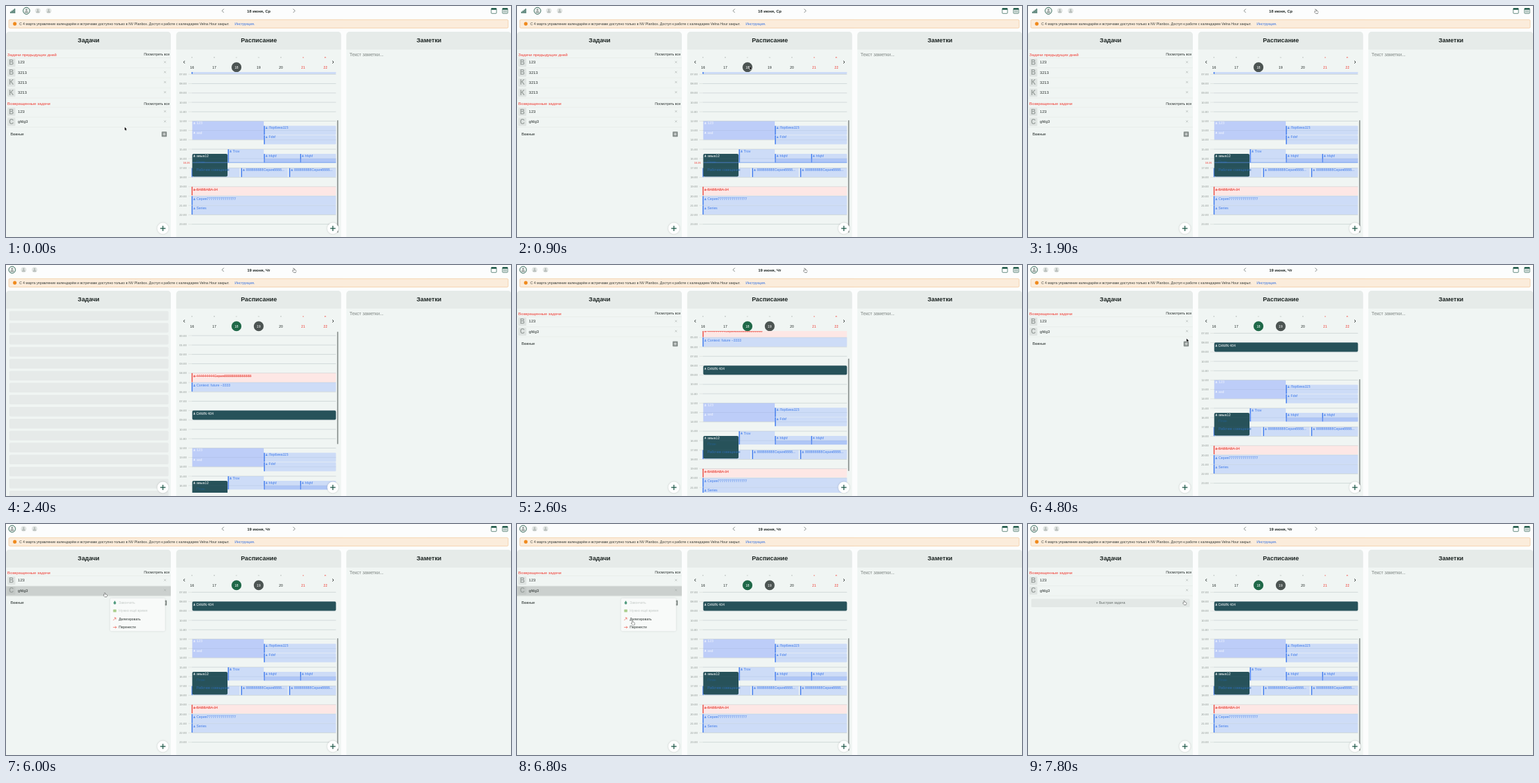
An HTML page with a canvas for the animation above (8 s loop, 766 px wide and 350 px high).

```html
<!DOCTYPE html>
<html lang="ru">
<head>
<meta charset="utf-8">
<title>Планировщик</title>
<style>
html, body { margin: 0; width: 100%; height: 100%; overflow: hidden; background: #fcfdfd; }
canvas { display: block; width: 766px; height: 350px; }
</style>
</head>
<body>
<canvas id="stage"></canvas>
<script>
const W = 766, H = 350, LOOP = 8000, HOUR = 14.2;
const FONT = '"Liberation Sans", Arial, sans-serif';
const GREEN = '#1d5747', BLUE = '#3f7bea', RED = '#f0372f', INK = '#1c2422';
const canvas = document.getElementById('stage');
const ctx = canvas.getContext('2d');
const dpr = window.devicePixelRatio || 1;
canvas.width = W * dpr;
canvas.height = H * dpr;

function rect(x, y, w, h, fill, r = 0, stroke) {
  ctx.beginPath();
  ctx.roundRect(x, y, w, h, r);
  if (fill) { ctx.fillStyle = fill; ctx.fill(); }
  if (stroke) { ctx.strokeStyle = stroke; ctx.lineWidth = 0.7; ctx.stroke(); }
}

function disc(x, y, r, fill, stroke, width = 1) {
  ctx.beginPath();
  ctx.arc(x, y, r, 0, Math.PI * 2);
  if (fill) { ctx.fillStyle = fill; ctx.fill(); }
  if (stroke) { ctx.strokeStyle = stroke; ctx.lineWidth = width; ctx.stroke(); }
}

function line(color, width, ...pts) {
  ctx.beginPath();
  for (let i = 0; i < pts.length; i += 2) ctx.lineTo(pts[i], pts[i + 1]);
  ctx.strokeStyle = color;
  ctx.lineWidth = width;
  ctx.stroke();
}

function text(str, x, y, size, color, align = 'left', weight = 'normal') {
  ctx.font = `${weight} ${size}px ${FONT}`;
  ctx.textAlign = align;
  ctx.textBaseline = 'middle';
  ctx.fillStyle = color;
  ctx.fillText(str, x, y + 0.3);
  return ctx.measureText(str).width;
}

function plus(x, y, r, color, width) {
  line(color, width, x - r, y, x + r, y);
  line(color, width, x, y - r, x, y + r);
}

function chevron(x, y, dir, s, color) {
  line(color, 0.9, x - dir * s / 2, y - s, x + dir * s / 2, y, x - dir * s / 2, y + s);
}

function person(x, y, s, color) {
  disc(x, y - s * 0.45, s * 0.5, color);
  ctx.beginPath();
  ctx.ellipse(x, y + s, s, s * 0.8, 0, Math.PI, 0);
  ctx.fill();
}

// ---- header ----
function avatar(x, active) {
  if (active) disc(x, 7.3, 5.1, '#eef2f0', GREEN, 0.9);
  else disc(x, 7.3, 4.2, '#e2e6e4');
  person(x, 7.3, active ? 2.9 : 2.6, active ? '#8f9a96' : '#b3b9b6');
}

function calendarIcon(x) {
  rect(x - 4, 3.5, 8, 7.8, '#fff', 1, GREEN);
  rect(x - 4, 3.3, 8, 2.5, GREEN, 0.8);
}

function header(next) {
  if (!next) for (let i = 0; i < 4; i++) rect(6.5 + i * 2, 8.5 - i * 1.5, 1.3, 2.5 + i * 1.5, GREEN);
  (next ? [9.3, 26.7, 43.3] : [31, 48.3, 64.7]).forEach((x, i) => avatar(x, i === 0));
  chevron(329, 7.3, -1, 2.8, '#6f7775');
  chevron(437, 7.3, 1, 2.8, '#6f7775');
  text(next ? '19 июня, Чт' : '18 июня, Ср', 383.4, 7.6, 6, INK, 'center', 'bold');
  calendarIcon(740);
  calendarIcon(757);
  for (let i = 0; i < 6; i++) rect(754.6 + i % 3 * 1.9, 7 + (i / 3 | 0) * 1.8, 1, 1, GREEN);

  rect(4.3, 20.8, 757.4, 12.6, '#fbecdb', 1.5, '#f1c697');
  disc(13.3, 27, 2.7, '#f08a1d');
  text('С 4 марта управление календарём и встречами доступно только в NV Planbox. ' +
    'Доступ к работе с календарем Velna Hour закрыт.', 20.3, 27, 5.3, '#333936');
  text('Инструкция.', 347, 27, 5.35, '#2f6fe4');
}

function panel(x, title) {
  rect(x, 39, 250, 320, '#f0f5f3', 5);
  rect(x, 39, 250, 27, '#e6ebe9', [5, 5, 0, 0]);
  text(title, x + 125.3, 52.3, 9.3, INK, 'center', 'bold');
}

function addButton(x) {
  ctx.save();
  ctx.shadowColor = 'rgba(0,0,0,.18)';
  ctx.shadowBlur = 3 * dpr;
  disc(x, 337, 8.5, '#fff');
  ctx.restore();
  plus(x, 337, 4, GREEN, 1.3);
}

// ---- tasks ----
function taskRow(letter, label, y, hover) {
  if (hover) rect(0, y - 6.7, 250, 15, '#cbd0ce');
  rect(2, y - 6, 12.2, 12.2, hover ? '#c3c8c6' : '#dfe4e2', 1);
  text(letter, 8, y + 0.3, 10, '#9aa19e', 'center', 'bold');
  text(label, 18, y - 0.2, 6.1, '#262d2b');
  const c = '#a3aaa7';
  line(c, 0.6, 239.7, y - 2.2, 242.7, y + 0.8);
  line(c, 0.6, 242.7, y - 2.2, 239.7, y + 0.8);
  line('#e2e7e5', 0.6, 0, y + 8, 250, y + 8);
}

function groupTitle(label, y) {
  text(label, 2, y, 6.2, RED);
  text('Посмотреть все', 248.2, y, 5.3, '#262d2b', 'right');
  line('#e2e7e5', 0.6, 0, y + 5, 250, y + 5);
}

function quickRow(y, hover) {
  if (hover) {
    rect(5, y - 6, 240.5, 12.4, '#e3e8e6', 1.5);
    text('+ Быстрая задача', 125.3, y, 5.3, '#646c69', 'center');
    return;
  }
  text('Важные', 7, y, 5.4, INK);
  rect(236, y - 4, 8, 8, '#8d9592', 1.2);
  plus(240, y, 2.2, '#fff', 0.7);
}

function menu() {
  ctx.save();
  ctx.shadowColor = 'rgba(0,0,0,.13)';
  ctx.shadowBlur = 3 * dpr;
  rect(158, 112.5, 83.3, 49.7, '#f8faf9', 2);
  ctx.restore();
  disc(165, 119.8, 1.9, '#4f9a7d');
  ctx.beginPath();
  ctx.moveTo(165, 116);
  ctx.lineTo(166.7, 119);
  ctx.lineTo(163.3, 119);
  ctx.fill();
  rect(162.6, 129.6, 4.8, 4, '#a9cd8c', 0.6);
  line('#ef6a5f', 0.8, 162.6, 146, 166.6, 142);
  line('#ef6a5f', 0.8, 164, 142, 166.6, 142, 166.6, 144.6);
  line('#ef6a5f', 0.8, 162.5, 156.5, 167.5, 156.5);
  line('#ef6a5f', 0.8, 165.7, 154.7, 167.5, 156.5, 165.7, 158.3);
  ['Закончить', 'Нужно ещё время', 'Делегировать', 'Перенести'].forEach((s, i) =>
    text(s, 171, 119.2 + i * 12.45, 5.2, i < 2 ? '#c3c9c6' : '#2c3331'));
}

function tasks(t) {
  if (t >= 2000 && t < 2500) {
    for (let i = 0; i < 16; i++) rect(5, 69.7 + i * 18.15, 241.5, 14.6, '#e6eae9', 2);
    return;
  }
  if (t < 2000) {
    groupTitle('Задачи предыдущих дней', 73.5);
    taskRow('B', '123', 85.7);
    taskRow('B', '3213', 100.9);
    taskRow('K', '3213', 116.1);
    taskRow('K', '3213', 131.3);
    groupTitle('Возвращенные задачи', 148.3);
    taskRow('B', '123', 160.3);
    taskRow('C', 'gfdg3', 175.5);
    quickRow(194.2, false);
    return;
  }
  groupTitle('Возвращенные задачи', 73.5);
  taskRow('B', '123', 85.7);
  taskRow('C', 'gfdg3', 100.9, t >= 5400 && t < 6900);
  quickRow(119.5, t >= 7600);
  if (t >= 6000 && t < 7000) menu();
}

// ---- schedule ----
const KINDS = {
  light: { fill: '#cddcf7', bar: '#4a82ee', ink: BLUE },
  mid: { fill: '#bdcdf8', ink: '#f4f7ff' },
  dark: { fill: '#27525a', ink: '#fff' },
  red: { fill: '#fde7e5', bar: '#ea5951', ink: '#ea4f47', strike: true }
};

// kind, left, right, start hour, end hour, label
const SHARED = [
  ['mid', 282.5, 391, 12, 14, '123'],
  ['light', 391, 500.5, 12.5, 13.5, 'Лорбина115'],
  ['light', 391, 500.5, 13.5, 14.5, 'Fdsf'],
  ['light', 336.5, 391, 15, 16.45, 'Trov'],
  ['light', 391, 446, 15.5, 16.45, 'hfqhf'],
  ['light', 446, 500.5, 15.5, 16.45, 'hfqhf'],
  ['light', 281.5, 354.5, 17, 18, ''],
  ['light', 356.5, 427.5, 17, 18, '888888888Серия8888...'],
  ['light', 429.5, 500.5, 17, 18, '888888888Серия8888...'],
  ['dark', 282.5, 336, 15.5, 17.95, 'авыа12'],
  ['red', 281.5, 500.5, 19, 19.95, 'BABBABA 34'],
  ['light', 281.5, 500.5, 20, 21, 'Серия777777777777777'],
  ['light', 281.5, 500.5, 21, 22, 'Series']
];
const DAY18 = [['light', 281.5, 500.5, 6, 7, '']];
const DAY19 = [
  ['red', 281.5, 500.5, 4, 5, '444444444Серия88888888888888'],
  ['light', 281.5, 500.5, 5, 6, 'Context: future ~3333'],
  ['dark', 282.5, 500.5, 8, 9, 'DAMN 404']
];

function eventBox([kind, x0, x1, from, to, label], base) {
  const k = KINDS[kind], y = base + from * HOUR, x = x0 + (k.bar ? 7.5 : 6.5);
  rect(x0, y, x1 - x0, (to - from) * HOUR - 0.4, k.fill, kind === 'dark' ? 2 : 1);
  if (k.bar) rect(x0, y, 1.6, (to - from) * HOUR - 0.4, k.bar, 0.6);
  if (!label) return;
  const ty = y + (x1 - x0 > 200 ? 4.4 : 2.9);
  person(x - 3.3, ty, 1.5, k.ink);
  const w = text(label, x, ty, 5.3, k.ink);
  if (k.strike) line(k.ink, 0.6, x - 5, ty + 0.2, x + w, ty + 0.2);
}

function scrollAt(t) {
  const p = Math.min(1, Math.max(0, (t - 2400) / 660));
  return 1 - (1 - p) ** 3;
}

function schedule(t) {
  const next = t >= 2000, loaded = !next || t >= 2400;
  const base = 107 - 103 * (next ? scrollAt(t) : 1);
  const yAt = h => base + h * HOUR;

  ['п', 'в', 'с', 'ч', 'п', 'с', 'в'].forEach((d, i) => {
    const x = 282.2 + i * 33.7, chosen = i === (next ? 3 : 2), today = i === 2;
    const red = i > 4;
    text(d, x, 78, 4.2, red ? RED : '#aeb5b2', 'center');
    if (chosen || today) disc(x, 92.7, 7.5, chosen ? '#4c5452' : '#1f6848');
    text(String(16 + i), x, 92.8, 5.3, chosen || today ? '#fff' : red ? RED : INK, 'center');
  });
  chevron(270.3, 85, -1, 2, INK);
  chevron(496, 85, 1, 2, INK);

  ctx.save();
  ctx.beginPath();
  ctx.rect(258, 100, 250, 245);
  ctx.clip();
  for (let h = 0; h < 24; h++) {
    text(String(h).padStart(2, '0') + ':00', 268.4, yAt(h), 4.4, '#8c9491', 'center');
    line('#d9dfdc', 0.7, 276.5, yAt(h), 500.5, yAt(h));
  }
  if (loaded) {
    (next ? DAY19 : DAY18).concat(SHARED).forEach(e => eventBox(e, base));
    person(285.7, yAt(13) + 3.2, 1.5, '#f4f7ff');
    text('asd', 289, yAt(13) + 3.2, 5.3, '#f4f7ff');
    rect(391, yAt(16), 109.5, 6.2, 'rgba(130,165,242,.4)');
    text('План', 289, yAt(16) + 5, 5.3, '#245f8c');
    text('Рабочее совещание', 289, yAt(17) + 2.9, 5.3, '#2f6db5');
    for (let h = 0; h < 24; h++) line('rgba(90,115,150,.16)', 0.7, 282, yAt(h), 500.5, yAt(h));
    if (!next) {
      text('16:26', 273.8, yAt(16.42), 4, RED, 'center');
      line('#5a8bec', 0.7, 283, yAt(16.42), 500.5, yAt(16.42));
    }
  }
  rect(502.2, 101 + 72 * (next ? scrollAt(t - 40) : 1), 1.9, 170.5, '#929997', 1);
  ctx.restore();
}

// ---- pointer ----
// start, end, x, y reached at the end
const MOVES = [
  [0, 100, 184, 182], [200, 500, 314, 130], [600, 1400, 437.3, 8.5],
  [3400, 4100, 319, 124], [4600, 4900, 213, 107], [5000, 5200, 203, 107],
  [5300, 5800, 150.5, 107.5], [6000, 6800, 176, 150], [6800, 7200, 188, 174],
  [7300, 7800, 237.5, 119.5]
];

function pointerAt(t) {
  let x = 180, y = 183.5;
  for (const [a, b, nx, ny] of MOVES) {
    if (t <= a) break;
    const p = Math.min(1, (t - a) / (b - a)), e = p * p * (3 - 2 * p);
    x += (nx - x) * e;
    y += (ny - y) * e;
  }
  return [x, y];
}

function shape(x, y, pts, fill, stroke) {
  ctx.beginPath();
  for (let i = 0; i < pts.length; i += 2) ctx.lineTo(x + pts[i], y + pts[i + 1]);
  ctx.closePath();
  ctx.lineJoin = 'round';
  ctx.strokeStyle = stroke;
  ctx.lineWidth = 0.8;
  ctx.stroke();
  ctx.fillStyle = fill;
  ctx.fill();
}

function pointer(t) {
  const [x, y] = pointerAt(t);
  const hand = (t >= 1300 && t < 3500) || (t >= 4900 && t < 7000) || t >= 7600;
  if (hand) {
    shape(x, y, [-1.2, -3, -0.3, -3, -0.1, -1, 2, -0.6, 2.6, 0.2, 2.2, 2.8, -0.8, 2.8, -2.6, 0.4, -1.2, 0.4],
      '#fff', '#1b1f1e');
  } else {
    shape(x, y, [0, 0, 0, 4.8, 1.1, 3.8, 1.9, 5.4, 2.7, 5, 2, 3.5, 3.4, 3.4], '#111', '#fff');
  }
}

function draw(t) {
  ctx.setTransform(dpr, 0, 0, dpr, 0, 0);
  rect(0, 0, W, H, '#fcfdfd');
  header(t >= 2000);
  panel(0, 'Задачи');
  panel(258.3, 'Расписание');
  panel(516.3, 'Заметки');
  text('Текст заметки...', 521, 74, 7.1, '#7d8582');
  tasks(t);
  schedule(t);
  addButton(238);
  addButton(495.8);
  pointer(t);
}

const begin = performance.now();
function tick() {
  const t = (performance.now() - begin) % LOOP;
  draw(Math.floor(t / 100) * 100);
  requestAnimationFrame(tick);
}
tick();
</script>
</body>
</html>
```
